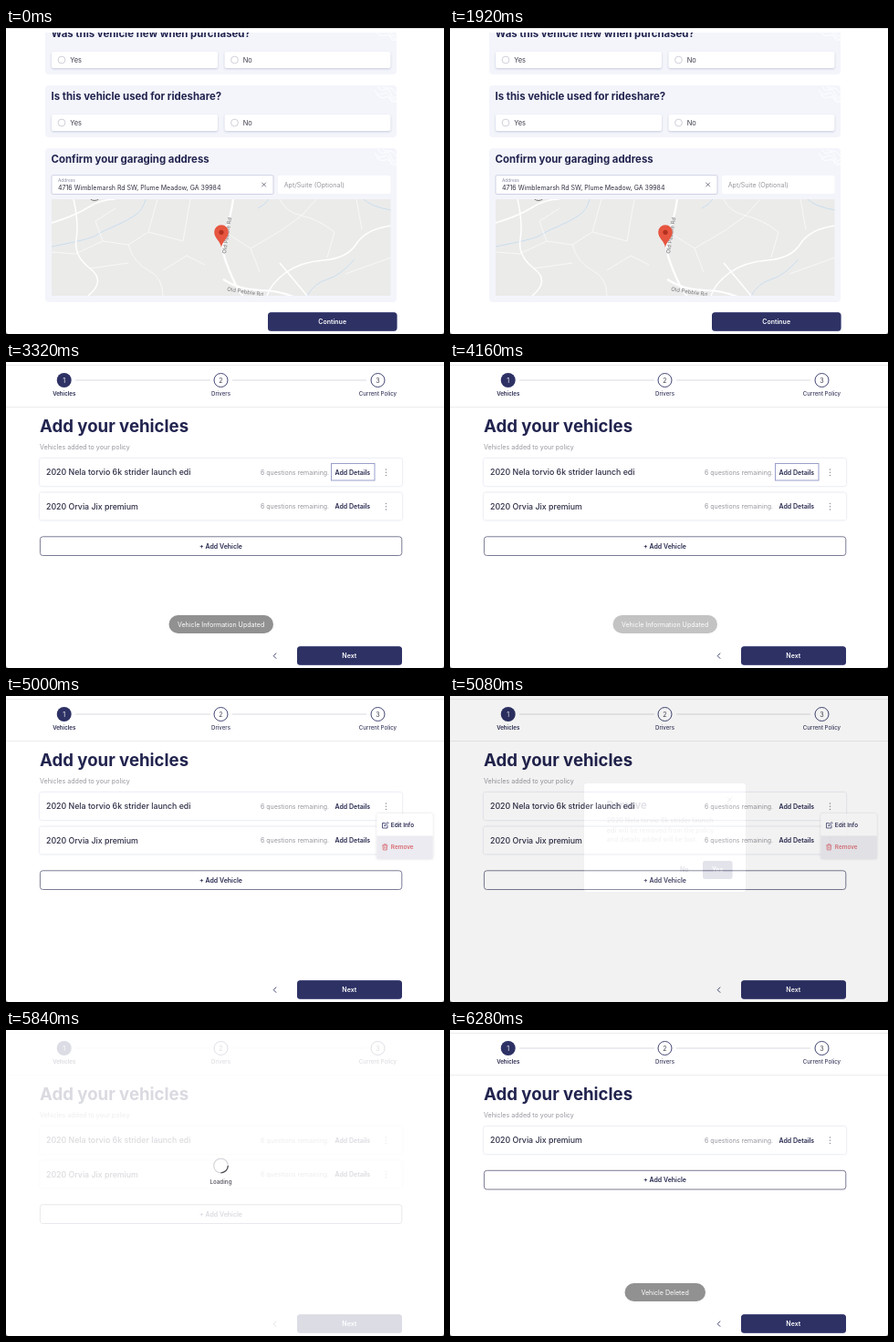
These frames come from a looping animation (480 px wide and 336 px high, 7520 ms). An HTML page:

```html
<!DOCTYPE html>
<html lang="en">
<head>
<meta charset="utf-8">
<title>Add your vehicles</title>
<style>
html, body { margin: 0; width: 100%; height: 100%; overflow: hidden; background: #fff; }
svg { display: block; width: 100vw; height: 100vh; }
text { font: 400 7.1px Inter, sans-serif; fill: #3e3f4c; }
.navy { fill: #2d3164; }
.title { font-size: 18.6px; font-weight: 700; fill: #22244f; }
.head { font-size: 11.4px; font-weight: 700; fill: #22244f; }
.bold { font-size: 7px; font-weight: 600; fill: #25274d; }
.step { font-size: 6.1px; font-weight: 500; fill: #3c3e60; }
.name { font-size: 8.8px; font-weight: 500; fill: #2c2d45; }
.soft { fill: #96969f; }
.strong { font-weight: 600; }
.menu { font-size: 6.4px; font-weight: 600; fill: #25274d; }
.mid { text-anchor: middle; }
.white { fill: #fff; }
.panel { fill: #f4f5fb; }
.box { fill: #fff; filter: drop-shadow(0 1px .8px #c6c9da); }
.card { fill: #fff; filter: drop-shadow(0 .8px .8px #cfd2e4); }
.button { fill: #2d3164; filter: drop-shadow(0 .6px .6px #a9add0); }
.pop { fill: #fff; filter: drop-shadow(0 .5px 1.5px #0002); }
.line { fill: none; stroke: #2d3164; stroke-width: .9; }
.road { fill: none; stroke: #f8f8f8; stroke-width: 1; }
.main { stroke: #fff; stroke-width: 1.5; }
.water { fill: none; stroke: #c9deee; stroke-width: 1; }
.label { font-size: 6px; fill: #777; stroke: #eee; stroke-width: 1.2px; paint-order: stroke; }
</style>
</head>
<body>
<svg viewBox="0 0 480 336">
<defs>
  <g id="option">
    <rect class="box" width="182" height="18" rx="2"/>
    <circle cx="11" cy="9" r="3.9" fill="none" stroke="#c3c4cf" stroke-width=".8"/>
  </g>
  <g id="choices">
    <use href="#option" x="50"/><use href="#option" x="239.5"/>
    <text x="70.3" y="11.8" style="font-size:7.4px">Yes</text>
    <text x="259.8" y="11.8" style="font-size:7.4px">No</text>
  </g>
  <path id="swirl" d="M404 5q3 7 9 4t8 5 7 2M408 1q2 6 7 4t7 5 6 2M413 1q2 3 6 2t9 6M406 10q5 5 9 3t13 6" fill="none" stroke="#fff" stroke-width=".9"/>
  <g id="card">
    <rect class="card" x="37" y="106" width="397" height="30" rx="2"/>
    <text class="soft" x="279" y="123.6" style="font-size:7px">6 questions remaining.</text>
    <text class="bold" x="360.5" y="123.5">Add Details</text>
    <path d="M416.5 118v0M416.5 121.2v0M416.5 124.4v0" stroke="#8b8c98" stroke-width="1.5" stroke-linecap="round"/>
  </g>
  <path id="cross" d="M-2.3 -2.3L2.3 2.3M2.3 -2.3L-2.3 2.3" fill="none" stroke="#55576a" stroke-width=".8"/>
  <clipPath id="mapArea"><rect x="50" y="188" width="371.5" height="106"/></clipPath>
</defs>

<rect width="480" height="336" fill="#fff"/>

<g id="form">
  <rect class="panel" x="43" y="0" width="385" height="51" rx="4"/>
  <rect class="panel" x="43" y="63" width="385" height="57" rx="4"/>
  <rect class="panel" x="43" y="132" width="385" height="169" rx="4"/>
  <use href="#swirl" y="-5"/><use href="#swirl" y="63"/><use href="#swirl" y="132"/>
  <text class="head" x="49.5" y="10.4">Was this vehicle new when purchased?</text>
  <text class="head" x="49.5" y="79.4">Is this vehicle used for rideshare?</text>
  <text class="head" x="49.5" y="148.4">Confirm your garaging address</text>
  <rect width="480" height="5" fill="#fff"/>
  <path d="M0 .5H480" stroke="#e3e3e6"/>
  <use href="#choices" y="26"/>
  <use href="#choices" y="95"/>

  <rect x="50" y="161.7" width="243" height="20.8" rx="1.5" fill="#fff" stroke="#bcbfd8" stroke-width=".7"/>
  <text x="57" y="169" style="font-size:4.8px;fill:#8a8ca6">Address</text>
  <text x="57" y="178" style="font-size:7px;fill:#2f3040">4716 Wimblemarsh Rd SW, Plume Meadow, GA 39984</text>
  <use href="#cross" x="282.6" y="172"/>
  <rect x="298" y="162" width="123.5" height="20" rx="2" fill="#fff"/>
  <text class="soft" x="304.7" y="175">Apt/Suite (Optional)</text>

  <g clip-path="url(#mapArea)">
    <rect x="50" y="188" width="372" height="106" fill="#ebebea"/>
    <path class="water" d="M153 188q-3 12-12 18t-23 12-20 10-48 12M288 188q-4 6-12 10M392 188q8 8 30 12M330 294q8-14 22-18t30-22"/>
    <path class="road" d="M50 246l26 2 30-14 28 4 22-14 38 10M134 238q6 20 22 28t16 28M106 234l-8-22 22-14M156 224l10-36M172 266l26-16 20 10M194 234l8-46M92 264l42-6M300 188q6 14 24 18t36 18M324 206l16-18M360 224l-8 28M268 242l34-20 22-16M372 270l50-18M390 221l-6-33M240 224l28 18 10 26"/>
    <path class="road main" d="M50 214q26-8 40-17t30-9M74 188q6 26 3 44t15 32-2 30M422 217q-28 4-38 20t-36 18-42 14-20 25M300 258l30 36"/>
    <path class="road main" style="stroke-width:2.2" d="M249 188q-3 20-8 34t-3 24 10 28 12 20M238 276q18 12 42 12t50 14"/>
    <text class="label" transform="translate(241 248) rotate(-81)">Old Pebble Rd</text>
    <text class="label" transform="translate(242 288.5) rotate(9)">Old Pebble Rd</text>
    <circle cx="97" cy="182.5" r="7" fill="none" stroke="#777"/>
    <path d="M236 241.3c-.6-7-7.8-10.300-7.800-17.300a7.800 7.800 0 0 1 15.600 0c0 7-7.200 10.300-7.800 17.300z" fill="#e6553f"/>
    <circle cx="236" cy="224.300" r="2.600" fill="#b3301f"/>
  </g>
  <rect class="button" x="287" y="312.3" width="141.500" height="20.500" rx="3.500"/>
  <text class="bold white mid" x="357.700" y="325.300">Continue</text>
</g>

<g id="list">
  <path d="M0 3.5H480M0 49.5H480" stroke="#ededf0"/>
  <path d="M76 20H224M248 20H395" stroke="#d9dae2"/>
  <circle class="navy" cx="63.7" cy="20" r="8"/>
  <circle class="line" cx="235.5" cy="20" r="7.5"/>
  <circle class="line" cx="407.5" cy="20" r="7.5"/>
  <text class="mid white" x="63.7" y="22.6">1</text>
  <text class="mid" x="235.5" y="22.6">2</text>
  <text class="mid" x="407.5" y="22.6">3</text>
  <text class="step mid" x="63.7" y="37" style="font-weight:600;fill:#25274d">Vehicles</text>
  <text class="step mid" x="235.5" y="37">Drivers</text>
  <text class="step mid" x="407.5" y="37">Current Policy</text>
  <text class="title" x="37" y="76.7">Add your vehicles</text>
  <text class="soft" x="37" y="96">Vehicles added to your policy</text>

  <g id="first">
    <use href="#card"/>
    <text class="name" x="44" y="124.3">2020 Nela torvio 6k strider launch edi</text>
    <rect id="focus" x="356.5" y="111.5" width="47.5" height="18.5" fill="none" stroke="#9a9fca"/>
  </g>
  <g id="rest">
    <use href="#card" y="37.5"/>
    <text class="name" x="44" y="161.8">2020 Orvia Jix premium</text>
    <rect class="line" x="37.4" y="191.8" width="396.4" height="20.7" rx="3" style="stroke:#6b6d87"/>
    <text class="bold mid" x="235.5" y="204.6">+ Add Vehicle</text>
  </g>

  <path class="line" d="M296.2 319.7l-3 3 3 3"/>
  <rect class="button" x="319" y="312.3" width="115" height="20.5" rx="3.5"/>
  <text class="bold white mid" x="376.3" y="325.3">Next</text>

  <g id="updated">
    <rect x="178.5" y="278" width="114.5" height="20" rx="10" fill="#919191"/>
    <text class="mid white" x="235.6" y="290.6">Vehicle Information Updated</text>
  </g>
  <g id="deleted">
    <rect x="191.5" y="278" width="88.5" height="20" rx="10" fill="#919191"/>
    <text class="mid white" x="235.6" y="290.6">Vehicle Deleted</text>
  </g>

  <g id="menu">
    <rect class="pop" x="406.3" y="129" width="61.5" height="50" rx="2"/>
    <rect id="hover" x="406.3" y="153.500" width="61.5" height="25.500" fill="#ebebf1"/>
    <path class="line" d="M415.5 139.5h-3v5.5h5.5v-3M414.8 142.7l.3-1.3 3-3 1 1-3 3z" style="stroke-width:.8"/>
    <text class="menu" x="421.8" y="144.4">Edit Info</text>
    <path class="line" d="M412.3 164h6M414 164v-1.2h2.6v1.2M413 164l.3 5h4l.3-5M414.7 165.5v2M416 165.5v2" style="stroke:#d9696f;stroke-width:.8"/>
    <text class="menu" x="421.8" y="168.4" style="fill:#d9696f">Remove</text>
  </g>
</g>

<g id="dialog">
  <rect width="480" height="336" opacity=".4"/>
  <rect class="pop" x="147" y="96" width="177" height="119" rx="3"/>
  <use href="#cross" x="306.5" y="113.7"/>
  <text class="head" x="171.8" y="124.4" style="font-size:11.2px">Remove</text>
  <text class="soft strong" x="171.8" y="139">2020 Nela torvio 6k strider launch</text>
  <text class="soft" x="171.8" y="149.6"><tspan class="strong">edi</tspan> will be removed from the policy</text>
  <text class="soft" x="171.8" y="160.2">and details added will be lost.</text>
  <text class="bold mid" x="256.8" y="193.2">No</text>
  <rect id="press" x="276" y="180" width="35" height="22.5" rx="4" fill="#c9cce6"/>
  <rect class="button" x="277" y="181" width="32.5" height="20" rx="3"/>
  <text class="bold white mid" x="293.2" y="193.2">Yes</text>
</g>

<g id="loading">
  <rect width="480" height="336" fill="#fff" opacity=".83"/>
  <circle cx="235.5" cy="149" r="7.8" fill="none" stroke="#d2d2d6" stroke-width="1.1"/>
  <path id="arc" d="M243.3 149a7.8 7.8 0 0 1-7.8 7.8" fill="none" stroke="#4a4a52" stroke-width="1.2"/>
  <text class="mid" x="235.5" y="169.3" style="font-size:6.2px;font-weight:600;fill:#62626c">Loading</text>
</g>

<path d="M0 333v3h3q-3 0-3-3zM480 333v3h-3q3 0 3-3z" fill="#777"/>
</svg>
<script>
const LOOP = 7520;
const el = id => document.getElementById(id);
const ramp = (t, from, to) => Math.min(1, Math.max(0, (t - from) / (to - from)));
const easeOut = p => 1 - (1 - p) ** 3;

function show(id, opacity) {
  el(id).style.display = opacity > 0 ? '' : 'none';
  el(id).setAttribute('opacity', opacity);
}

function draw(t) {
  const listed = t >= 2480, removed = t >= 6120;
  show('form', +!listed);
  show('list', +listed);
  show('first', +!removed);
  show('focus', +(t < 4280));
  el('rest').setAttribute('transform', `translate(0 ${removed ? -37.5 : 0})`);

  show('updated', ramp(t, 2440, 2560) * (1 - ramp(t, 4060, 4280)));
  show('deleted', ramp(t, 6080, 6240));

  const open = easeOut(ramp(t, 4260, 4520));
  const scale = 0.75 + 0.25 * open;
  show('menu', open * (1 - ramp(t, 5070, 5200)));
  el('menu').setAttribute('transform', `translate(437 129) scale(${scale}) translate(-437 -129)`);
  show('hover', ramp(t, 4740, 4840));

  show('dialog', t < 5800 ? easeOut(ramp(t, 5070, 5320)) : 0);
  show('press', ramp(t, 5500, 5640));

  const busy = listed ? +(t >= 5800 && !removed) : ramp(t, 1950, 2040);
  show('loading', busy);
  el('arc').setAttribute('transform', `rotate(${(t - 5840) * 0.36} 235.5 149)`);
}

const start = performance.now();
function tick() {
  draw((performance.now() - start) % LOOP);
  requestAnimationFrame(tick);
}
tick();
</script>
</body>
</html>
```
